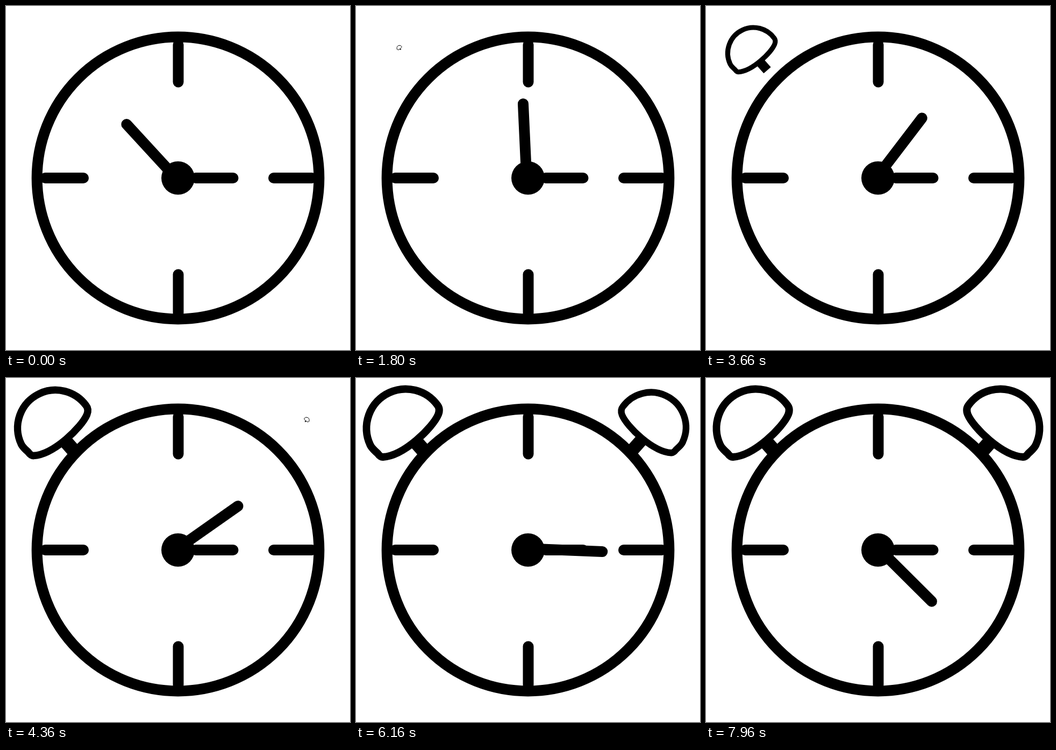
These frames come from a looping animation (640x640 px, 8 s). An HTML page with a canvas:

```html
<!DOCTYPE html>
<html lang="en">
<head>
<meta charset="utf-8">
<title>Alarm clock</title>
<style>
html, body { margin: 0; width: 100%; height: 100%; overflow: hidden; background: #fff; }
canvas { display: block; width: 640px; height: 640px; }
</style>
</head>
<body>
<canvas id="stage" width="640" height="640"></canvas>
<script>
const ctx = document.getElementById('stage').getContext('2d');
const LOOP = 8000, CYCLE = 1120;
const TICKS = [0, 120, 260, 360, 460, 580, 680, 820, 920, 1000];
const RAD = Math.PI / 180;

// Bell scale over steps, as [step, scale]
const LEFT = [[3, 0], [10, .015], [16, .067], [20, .145], [26, .345], [30, .55], [39, .966], [40, .98], [46, 1]];
const RIGHT = [[35, 0], [37, .02], [39, .07], [40, .11], [49, .688], [50, .75], [54, .89], [60, .982], [61, .986], [67, 1]];

function stepAt(t) {
  const rest = t % CYCLE;
  return Math.floor(t / CYCLE) * 10 + TICKS.filter(b => b <= rest).length - 1;
}

// Monotone cubic through the keys
function curve(keys, x) {
  const last = keys.length - 1;
  if (x <= keys[0][0]) return keys[0][1];
  if (x >= keys[last][0]) return keys[last][1];
  const slope = i => (keys[i + 1][1] - keys[i][1]) / (keys[i + 1][0] - keys[i][0]);
  const tangent = i => {
    if (i === 0 || i === last) return 0;
    const a = slope(i - 1), b = slope(i);
    return 2 * a * b / (a + b);
  };
  let i = 0;
  while (x >= keys[i + 1][0]) i++;
  const [x0, y0] = keys[i], [x1, y1] = keys[i + 1];
  const h = x1 - x0, u = (x - x0) / h, v = 1 - u;
  return y0 * (1 + 2 * u) * v * v + y1 * u * u * (3 - 2 * u)
    + h * u * v * (tangent(i) * v - tangent(i + 1) * u);
}

function line(x0, y0, x1, y1, width = 20, cap = 'round') {
  ctx.lineWidth = width;
  ctx.lineCap = cap;
  ctx.beginPath();
  ctx.moveTo(x0, y0);
  ctx.lineTo(x1, y1);
  ctx.stroke();
}

function bell(scale, mirrored) {
  if (scale <= 0) return;
  ctx.save();
  if (mirrored) {
    ctx.translate(640, 0);
    ctx.scale(-1, 1);
  }
  ctx.translate(80, 77);
  ctx.scale(scale, scale);
  ctx.translate(-80, -77);
  ctx.lineWidth = 14;
  ctx.lineJoin = 'round';
  ctx.beginPath();
  ctx.arc(92.5, 93.5, 73, 155 * RAD, 323.6 * RAD);
  ctx.bezierCurveTo(156, 56, 155, 63, 153, 68);
  ctx.bezierCurveTo(143, 92, 89, 145, 50, 147);
  ctx.bezierCurveTo(46, 147, 43, 144, 40, 140);
  ctx.bezierCurveTo(35, 135, 30, 132, 26.3, 124.4);
  ctx.closePath();
  ctx.stroke();
  line(108, 115, 132, 142, 27, 'butt');
  ctx.restore();
}

function face() {
  ctx.lineWidth = 20;
  ctx.beginPath();
  ctx.arc(320, 320, 262.4, 0, 2 * Math.PI);
  ctx.stroke();
  line(320.5, 72, 320.5, 141.5);
  line(320.5, 499.5, 320.5, 571);
  line(73, 320, 144, 320);
  line(498, 320, 569, 320);
  line(353, 320, 422.5, 320);
}

function minuteHand(step) {
  ctx.save();
  ctx.translate(320, 320);
  ctx.rotate((-42.65 + 2.5 * step) * RAD);
  line(-2.65, -26, -2.65, -138.3);
  ctx.restore();
}

function draw(t) {
  const step = stepAt(t);
  ctx.fillStyle = '#fff';
  ctx.fillRect(0, 0, 640, 640);
  ctx.fillStyle = ctx.strokeStyle = '#000';
  face();
  minuteHand(step);
  ctx.beginPath();
  ctx.arc(320, 320, 31, 0, 2 * Math.PI);
  ctx.fill();
  bell(curve(LEFT, step), false);
  bell(curve(RIGHT, step), true);
}

const start = performance.now();
function tick() {
  draw((performance.now() - start) % LOOP);
  requestAnimationFrame(tick);
}
tick();
</script>
</body>
</html>
```
